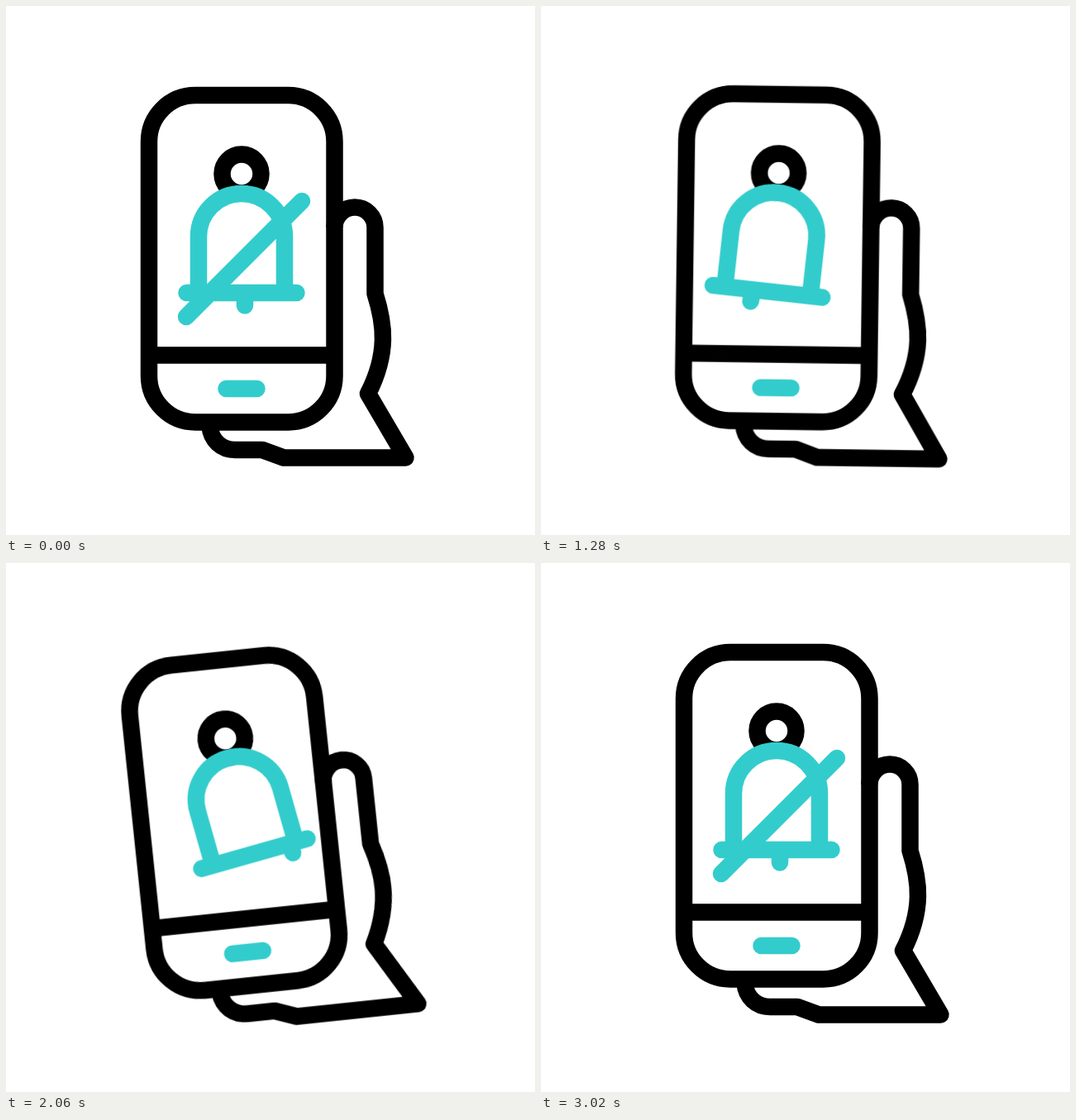
These frames come from a looping animation (640 by 640 pixels, 3220 ms). An HTML page:

```html
<!DOCTYPE html>
<html lang="en">
<head>
<meta charset="utf-8">
<title>Ringing phone</title>
<style>
  html, body { margin: 0; width: 100%; height: 100%; overflow: hidden; background: #fff; }
  svg { display: block; width: 100vw; height: 100vh; }

  path, rect, circle {
    fill: none;
    stroke: #000;
    stroke-width: 20.5;
    stroke-linecap: round;
    stroke-linejoin: round;
  }
  .teal { stroke: #3cc; stroke-width: 20.5; }
  .butt { stroke-linecap: butt; }

  .phone, .bell, .clapper, .slash {
    animation: 3220ms cubic-bezier(.333, 0, .667, 1) infinite;
  }
  .phone { animation-name: tilt; transform-origin: 364px 396px; }
  .bell { animation-name: swing; transform-origin: 285px 227px; }
  .clapper { animation-name: swing; transform-origin: 289px 122px; }
  .slash { animation-name: strike; stroke-dasharray: 1 2; }

  @keyframes tilt {
    0%, 6.832% { transform: rotate(0deg); }
    25.466%, 29.814% { transform: rotate(-12deg); }
    50.932% { transform: rotate(15.9deg); }
    61.491% { transform: rotate(-7deg); }
    73.913% { transform: rotate(2.6deg); }
    86.335%, 100% { transform: rotate(0deg); }
  }
  @keyframes swing {
    0%, 29.814% { transform: rotate(0deg); }
    48.447% { transform: rotate(10deg); }
    63.354% { transform: rotate(-10deg); }
    75.466% { transform: rotate(9.5deg); }
    93.789%, 100% { transform: rotate(0deg); }
  }
  @keyframes strike {
    0%, 6.832% { stroke-dashoffset: 0; opacity: 1; }
    19.255% { stroke-dashoffset: 1; opacity: 1; }
    19.256%, 77.639% { stroke-dashoffset: 1; opacity: 0; }
    77.64% { stroke-dashoffset: 1; opacity: 1; }
    89.441%, 100% { stroke-dashoffset: 0; opacity: 1; }
  }
</style>
</head>
<body>
<svg viewBox="0 0 640 640">
  <g class="phone">
    <!-- hand -->
    <path class="butt" d="M397.5 268A24.5 24.5 0 0 1 446.5 268V348C458 384 463 420 438 469L483.5 546.5H336L310 537H277C261 537 248 526 246.5 508"/>
    <!-- handset -->
    <rect x="173" y="108" width="224.5" height="395.5" rx="56"/>
    <path class="butt" d="M173 422.5H397.5"/>
    <path class="teal" d="M266.5 463H303.5"/>
    <circle cx="285" cy="203" r="23.5"/>
    <g class="bell">
      <path class="teal butt" d="M233 347V279A52 52 0 0 1 337 279V347"/>
      <path class="teal" d="M218.5 347H351.5"/>
      <path class="teal clapper" d="M289 351V362.5"/>
    </g>
    <path class="teal slash" pathLength="1" d="M358 236L218 376"/>
  </g>
</svg>
</body>
</html>
```
